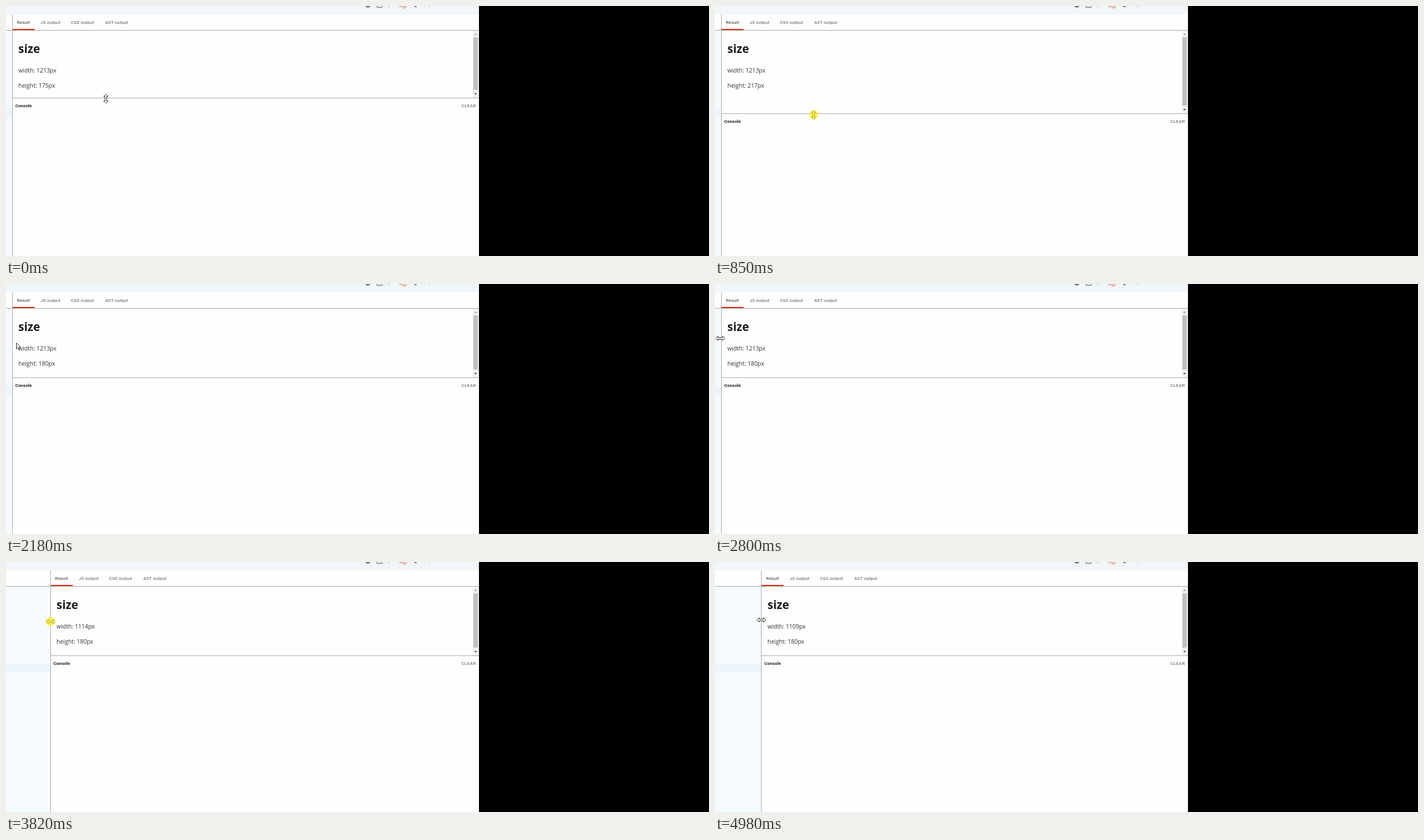
An HTML page for the animation above (5.54 s loop, 1253 by 447 pixels).

```html
<!DOCTYPE html>
<html lang="en">
<head>
<meta charset="utf-8">
<title>Resizable panes</title>
<style>
  html, body { margin: 0; width: 100%; height: 100%; overflow: hidden; background: #000; }
  svg { display: block; }
  .ui { font: 8px Roboto, sans-serif; letter-spacing: .15px; fill: #555; }
  .ui .strong { font-weight: 600; letter-spacing: .05px; fill: #222; }
  .ui .clear { letter-spacing: .35px; }
  .page { font: 10.4px "Open Sans", sans-serif; fill: #2f3336; }
  .page .title { font-size: 20.5px; font-weight: 700; fill: #1b1f1f; }
  .rule { fill: #a8a8a8; }
  .pointer { fill: #fff; stroke: #222; stroke-width: 1; }
</style>
</head>
<body>
<svg width="1253" height="447" viewBox="0 0 1253 447">
  <defs>
    <path id="resize" d="M0 -8 L4 -4 H1.5 V4 H4 L0 8 L-4 4 H-1.5 V-4 H-4 Z"/>
  </defs>
  <rect width="843" height="447" fill="#f5fafe"/>
  <rect width="843" height="15" fill="#f1f6fb"/>
  <g fill="#777b80">
    <circle cx="645" cy="-2" r="5"/>
    <path d="M661 0 V1 Q661 2.5 663 2.5 H669 Q671 2.5 671 1 V0" fill="none" stroke="#777b80" stroke-width="1.3"/>
    <rect x="681" width="3" height="1.5" opacity=".45"/>
    <rect x="701" width="4" height="2" opacity=".5"/>
    <circle cx="710" cy="0" r="5" fill="#f6b9a6"/>
    <rect x="728" width="4" height="2"/>
    <rect x="753" width="3" height="1" opacity=".6"/>
  </g>
  <rect y="15" width="843" height="28" fill="#fefefe"/>
  <rect y="183" width="843" height="15" fill="#ecf5fe"/>

  <rect id="pane" y="15" width="860" height="432" fill="#fefefe"/>
  <rect class="rule" y="43" width="843" height="1"/>
  <rect class="rule" id="edge" y="15" width="1" height="432"/>
  <rect class="rule" id="split" width="860" height="1"/>
  <rect id="underline" y="41" width="39" height="2" fill="#df2b0b"/>

  <g id="content">
    <g class="ui">
      <text x="8.3" y="32" fill="#333">Result</text>
      <text x="50.2" y="32">JS output</text>
      <text x="104.5" y="32">CSS output</text>
      <text x="165.5" y="32">AST output</text>
      <text class="strong" id="console" x="5.2">Console</text>
    </g>
    <g class="page" transform="translate(10.8)">
      <text class="title" y="84">size</text>
      <text id="width" y="118.5"></text>
      <text id="height" y="146"></text>
    </g>
  </g>
  <g class="ui"><text class="clear" id="clear" x="811.8">CLEAR</text></g>

  <rect id="track" x="832" y="44" width="11" fill="#f1f1f1"/>
  <rect id="thumb" x="833" y="56" width="8" fill="#c1c1c1"/>
  <path d="M834.5 51.5 H839.5 L837 49 Z" fill="#8f8f8f"/>
  <path id="down" d="M834.5 -1.5 H839.5 L837 1.3 Z" fill="#444"/>

  <g id="cursor">
    <use class="pointer" id="ns" href="#resize"/>
    <use class="pointer" id="ew" href="#resize" transform="rotate(90)"/>
    <path id="beam" d="M-2.5 -5.5 H-.5 M.5 -5.5 H2.5 M0 -5 V5 M-2.5 5.5 H-.5 M.5 5.5 H2.5" fill="none" stroke="#222"/>
    <path class="pointer" id="arrow" d="M.5 .5 V11 L3 8.7 L4.7 12.6 L6.5 11.8 L4.8 8 H8.2 Z" stroke-width=".9"/>
    <circle id="halo" r="8.3" fill="#fcec14" fill-opacity=".65"/>
  </g>
  <rect x="843" width="410" height="447" fill="#000"/>
</svg>
<script>
const LOOP = 5540, SCALE = 0.6875;
const START_EDGE = 11.2, START_WIDTH = 1213, START_SPLIT = 164, START_HEIGHT = 175;

// Every track holds its value until the next time stamp.
const heights = [[0, 175], [320, 176], [470, 212], [620, 231], [710, 247],
                 [850, 217], [930, 186], [1010, 180]];
const edges = [[0, START_EDGE], [3430, -5], [3520, 1], [3750, 45], [3820, 79.3],
               [4280, 67], [4360, 38], [4450, 17.5], [4600, 60], [4690, 82.75]];
const kinds = [[0, 'ns'], [1090, 'arrow'], [1170, 'beam'], [1870, 'arrow'], [2500, 'ew']];
const presses = [[0, false], [250, true], [1010, false], [3120, true], [4980, false]];
// A missing coordinate follows the divider being dragged.
const path = [[0, 178, null], [470, 177, null], [620, 176, null],
  [1090, 108, 138], [1170, 47, 110.5], [1400, 43, 110.5], [1550, 41, 110], [1640, 38.5, 109],
  [1800, 29, 109], [1870, 18, 106], [2180, 18, 105], [2260, 16, 104], [2410, 8, 97],
  [2500, 9.5, 97], [2980, 9, 96.5], [3120, 9.5, 96], [3350, -6, 94], [3430, null, 96],
  [3520, null, 99], [3750, null, 104], [3820, null, 106.5], [4450, null, 105], [4690, null, 103.5]];

const el = id => document.getElementById(id);
const at = (track, t) => track.findLast(([time]) => time <= t);
const set = (id, name, value) => el(id).setAttribute(name, value);

function draw(t) {
  const height = at(heights, t)[1];
  const edge = at(edges, t)[1];
  const split = START_SPLIT + (height - START_HEIGHT) * SCALE;
  const splitY = Math.floor(split), edgeX = Math.floor(edge);

  set('pane', 'x', edgeX);
  set('edge', 'x', edgeX);
  set('split', 'x', edgeX);
  set('split', 'y', splitY);
  set('underline', 'x', edgeX + 1);
  set('content', 'transform', `translate(${edge})`);
  set('console', 'y', splitY + 16.5);
  set('clear', 'y', splitY + 16.5);
  set('track', 'height', splitY - 44);
  set('thumb', 'height', splitY - 70);
  set('down', 'transform', `translate(0 ${splitY - 6.5})`);
  el('width').textContent = `width: ${Math.round(START_WIDTH - (edge - START_EDGE) / SCALE)}px`;
  el('height').textContent = `height: ${height}px`;

  const [, x, y] = at(path, t);
  const kind = at(kinds, t)[1];
  set('cursor', 'transform', `translate(${x ?? edge} ${y ?? split + 1.6})`);
  for (const id of ['ns', 'ew', 'beam', 'arrow']) {
    set(id, 'visibility', id === kind ? 'visible' : 'hidden');
  }
  set('halo', 'visibility', at(presses, t)[1] ? 'visible' : 'hidden');
}

const start = performance.now();
function tick() {
  draw((performance.now() - start) % LOOP);
  requestAnimationFrame(tick);
}
tick();
</script>
</body>
</html>
```
